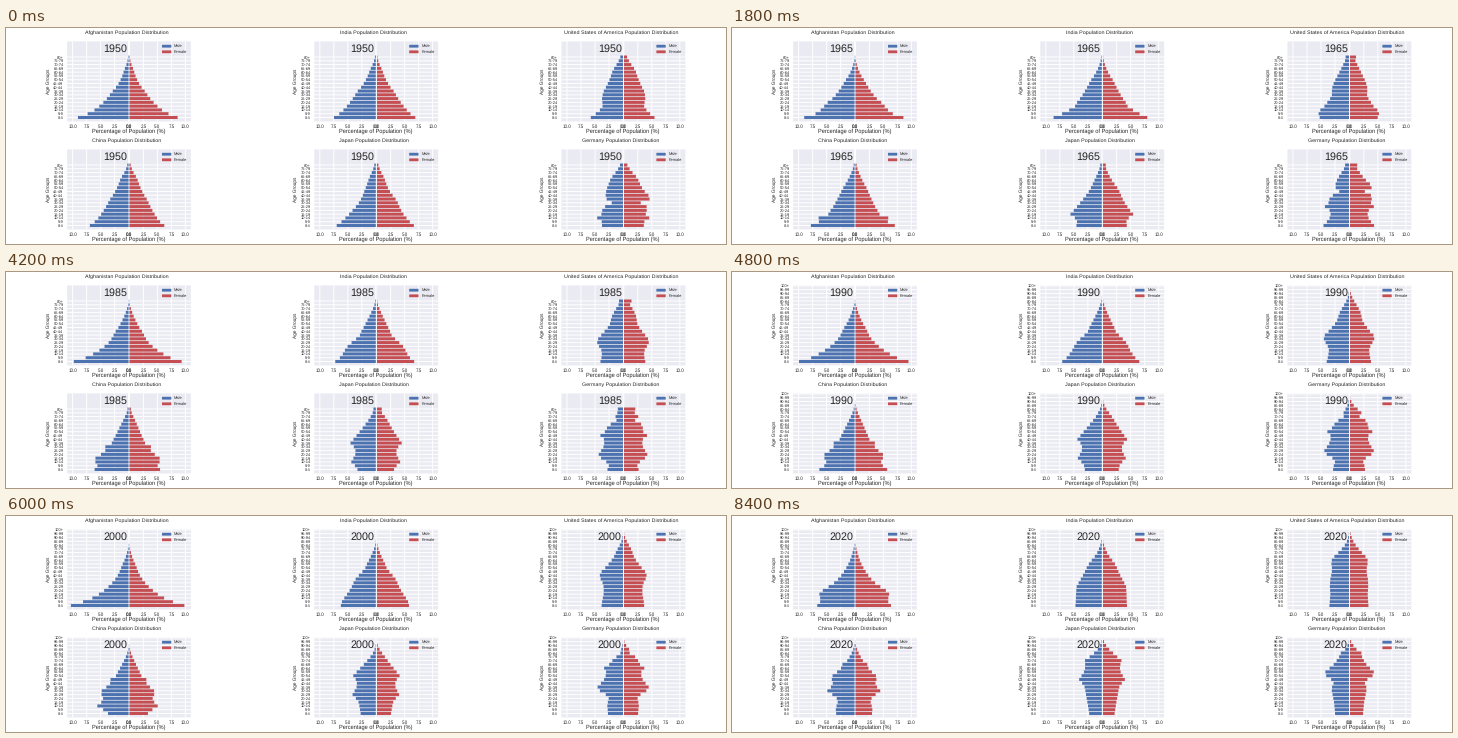
These frames come from a looping animation (720x216 px, 9 s). A matplotlib script:

```python
import numpy as np
import matplotlib.pyplot as plt
from matplotlib.animation import FuncAnimation
from matplotlib.patches import Rectangle

W, H = 720, 216
INK, PANEL = "#262626", "#EAEAF2"
BLUE, RED = "#4C72B0", "#C44E52"
STEPS, AGES = 15, 21
UNIT, ROW = 5.6, 3.78          # pixels per percent, pixels per age group
SPAN, GAP = 61.5, 0.4

plt.rcParams.update({
    "font.family": "Liberation Sans", "text.hinting": "none",
    "text.color": INK, "xtick.color": INK, "ytick.color": INK,
})


def groups(step):
    """Number of age groups reported; the open group is 80+ before 1990."""
    return 17 if step < 8 else AGES


def cohorts(trend, waves):
    """Cohort sizes 1890-2020: a trend through key points, times waves."""
    year = np.arange(1890, 2021, 5)
    keys = np.linspace(1890, 2020, len(trend))
    log = np.interp(year, keys, np.log(trend))
    for centre, width, height in waves:
        log += height * np.exp(-((year - centre) / width) ** 2)
    return np.exp(log)


def pyramids(trend, waves, death, boys=.512, gap=.18, war=0, moving=0):
    """Percent of the population as an array [step, sex, age group]."""
    sizes = cohorts(trend, waves)
    age = np.arange(AGES)
    first = np.zeros(AGES)
    first[:13] = sizes[12::-1]
    first[13:17] = sizes[0] * np.exp(-.21 * np.arange(1, 5) ** 1.45
                                     * (.5 + .33 * death[0]))
    male = boys - gap * .02 * age - war * np.exp(-((age - 6.7) / 2.2) ** 2)
    pop = np.array([first * male, first * (1 - male)])
    sex = np.array([[1 + gap], [1 - gap]])
    move = 1 + moving * ((age > 2) & (age < 7))
    out = np.zeros((STEPS, 2, AGES))
    for step, m in enumerate(np.linspace(*death, STEPS)):
        if step:
            hazard = .006 * m * m + .0005 * m * np.exp(.085 * (5 * age + 5))
            hazard[0] += .011 * m * m
            left = pop * np.exp(-hazard * sex) * move
            pop = np.roll(left, 1, axis=1)
            pop[:, -1] += left[:, -1]
            pop[:, 0] = sizes[12 + step] * np.array([boys, 1 - boys])
        n = groups(step)
        out[step, :, :n] = pop[:, :n]
        out[step, :, n - 1] = pop[:, n - 1:].sum(axis=1)
        out[step] *= 100 / out[step].sum()
    return out


# Waves are (year, width, height); death is the mortality in 1950 and 2020.
COUNTRIES = {
    "Afghanistan": pyramids(
        [1.8, 5.9, 12.8, 25, 54, 72], [(1950, 5, .13), (2003, 8, .22)],
        death=(3, 1.6), gap=.02),
    "India": pyramids(
        [8.5, 24, 43, 80, 114, 109], [(1962, 9, .1)],
        death=(2.4, 1.1), boys=.519, gap=.03),
    "United States of America": pyramids(
        [6.2, 10.9, 13.4, 16.2, 19.2, 20.2], [(1935, 7, -.14), (1958, 11, .31)],
        death=(1.1, .65), moving=.03),
    "China": pyramids(
        [16.7, 36.6, 60, 112, 108, 84],
        [(1955, 3, .17), (1972, 6, .13), (1990, 5, .22), (2003, 8, -.22)],
        death=(2.1, .75), boys=.526, gap=.08),
    "Japan": pyramids(
        [2.3, 5.1, 9.2, 8.2, 6.4, 4.9], [(1950, 5, .23), (1975, 6, .24)],
        death=(1.5, .5), war=.05),
    "Germany": pyramids(
        [3.45, 6, 5.1, 5.2, 4.2, 3.6],
        [(1920, 4, -.5), (1940, 3.5, .22), (1966, 8, .27), (1979, 6, -.2)],
        death=(1.25, .65), war=.1, moving=.025),
}

fig = plt.figure(figsize=(W / 72, H / 72), dpi=72, facecolor="white")


def label(x, y, text, size, **kw):
    kw = {"ha": "center", "va": "center", **kw}
    return fig.text(x / W, 1 - y / H, text, fontsize=size, **kw)


def half(left, top, limits):
    ax = fig.add_axes([left / W, 1 - (top + 80) / H, SPAN / W, 80 / H],
                      facecolor=PANEL)
    ax.patch.set_snap(False)
    ax.set_xlim(*limits)
    ax.set_ylim(-3.9 / ROW, 76.1 / ROW)
    ax.set_xticks(np.arange(0, 10.1, 2.5))
    ax.xaxis.set_major_formatter("{x:.1f}")
    ax.tick_params(length=0, pad=3)
    ax.tick_params(axis="x", labelsize=4.5)
    ax.tick_params(axis="y", labelsize=4, pad=3.5)
    ax.set_axisbelow(True)
    for spine in ax.spines.values():
        spine.set_visible(False)
    return ax


def show_ages(ax, n, named):
    names = [f"{5 * a}-{5 * a + 4}" for a in range(n - 1)] + [f"{5 * n - 5}+"]
    ax.set_yticks(range(n), names if named else [""] * n)
    ax.grid(True, color="white", lw=1, snap=False)


def key(x, y, color, text):
    fig.add_artist(Rectangle((x / W, 1 - (y + 1.4) / H), 9.3 / W, 2.8 / H,
                             transform=fig.transFigure, fc=color, lw=0,
                             snap=False))
    label(x + 12, y + .1, text, 4, ha="left")


class Pyramid:
    def __init__(self, x, y, name, data):
        limit = SPAN / UNIT
        self.data = data
        self.axes = [half(x - GAP - SPAN, y + 13.4, (limit, 0)),
                     half(x + GAP, y + 13.4, (0, limit))]
        self.bars = [ax.barh(range(AGES), np.zeros(AGES), height=.8,
                             color=color, lw=0, snap=False, zorder=2)
                     for ax, color in zip(self.axes, (BLUE, RED))]
        label(x - 2.3, y + 4.8, f"{name} Population Distribution", 5.35)
        label(x - .5, y + 103, "Percentage of Population (%)", 5.6)
        label(x - 80.3, y + 53, "Age Groups", 4.8, rotation=90)
        key(x + 33, y + 18.2, BLUE, "Male")
        key(x + 33, y + 23.8, RED, "Female")
        self.year = label(x - 25.6, y + 23.6, "", 10.7, ha="left",
                          va="baseline")

    def draw(self, step):
        for side, ax in enumerate(self.axes):
            show_ages(ax, groups(step), side == 0)
            for bar, value in zip(self.bars[side], self.data[step, side]):
                bar.set_width(value)
        self.year.set_text(str(1950 + 5 * step))


charts = [Pyramid(123 + 247.2 * (i % 3), 108 * (i // 3), name, data)
          for i, (name, data) in enumerate(COUNTRIES.items())]


def update(step):
    for chart in charts:
        chart.draw(step)
    return []


anim = FuncAnimation(fig, update, frames=STEPS, interval=600, repeat=True,
                     repeat_delay=0, blit=False)
plt.show()
```
